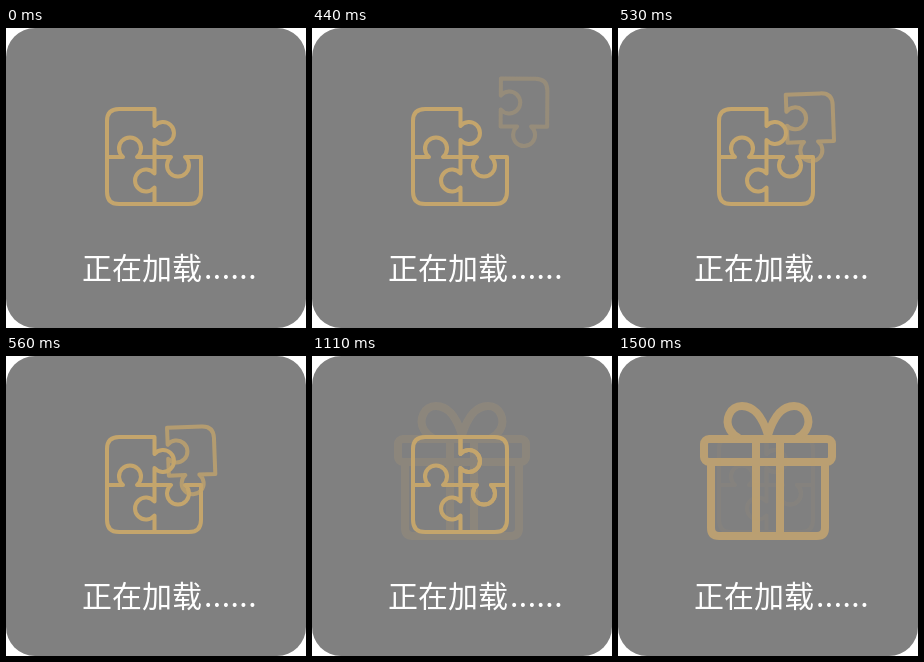
Recreate the animation shown at these times as an HTML page. Size 300 by 300 pixels, loop 1.59 s.

```html
<!DOCTYPE html>
<html lang="zh-CN">
<head>
<meta charset="utf-8">
<style>
html, body { margin: 0; width: 100%; height: 100%; overflow: hidden; background: #fff; }
svg { display: block; width: 100%; height: 100%; }
text { font: 30px "Noto Sans CJK SC", "Noto Sans CJK", sans-serif; fill: #fff; }
</style>
</head>
<body>
<svg viewBox="0 0 300 300">
  <rect width="300" height="300" rx="29" fill="#808080"/>
  <g fill="none" stroke="#c4a56c" stroke-linejoin="round">
    <g id="gift" stroke="#bfa271" stroke-width="8">
      <rect x="86" y="83" width="128" height="23" rx="5"/>
      <path d="M93 106V172Q93 180 101 180H199Q207 180 207 172V106M138 83V180M162 83V180"/>
      <path d="M150 79C146 66 138 50 124 50C112 50 106 64 112 74Q115 79 121 82M150 79C154 66 162 50 176 50C188 50 194 64 188 74Q185 79 179 82"/>
    </g>
    <g id="puzzle" stroke-width="4">
      <path d="M148.500 81H113Q101 81 101 93V164Q101 176 113 176H183Q195 176 195 164V129H179A11 11 0 1 1 165 129H148.500V112A11 11 0 1 0 148.500 98Z"/>
      <path d="M101 129H117A11 11 0 1 1 131 129H148.500V145.500A11 11 0 1 0 148.500 159.500V176"/>
      <path id="piece" d="M148.500 81H183Q195 81 195 93V129H179A11 11 0 1 1 165 129H148.500V112A11 11 0 1 0 148.500 98Z"/>
    </g>
  </g>
  <text x="76" y="251">正在加载</text>
  <text x="198" y="251" letter-spacing=".5">......</text>
</svg>
<script>
const LOOP = 1590;
const [gift, puzzle, piece] = ["gift", "puzzle", "piece"].map(id => document.getElementById(id));

// Progress of the sliding piece: one long hold, then even 30 ms steps.
const slide = t => t < 440 ? 0 : Math.min(7, 1 + Math.floor((t - 440) / 30)) / 7;

// Cross-fade stage: 0 before the gift appears, then 1 to 4.
const stage = t => [1110, 1260, 1380, 1500].filter(start => t >= start).length;

function draw(now) {
  const t = now % LOOP;
  const u = slide(t);
  const s = stage(t);
  const left = 1 - u;
  const angle = s ? 0 : 2 - 13 * u + 10 * u * u;

  piece.setAttribute("opacity", t < 320 ? 0 : 0.2 + 0.8 * u);
  piece.setAttribute("transform", `translate(${47 * left} ${-35.5 * left}) rotate(${angle} 172 105)`);
  gift.setAttribute("opacity", s ? 0.2 + 0.24 * (s - 1) : 0);
  puzzle.setAttribute("opacity", s ? 1 - 0.31 * (s - 1) : 1);
  requestAnimationFrame(() => draw(performance.now() - begin));
}

const begin = performance.now();
draw(0);
</script>
</body>
</html>
```
